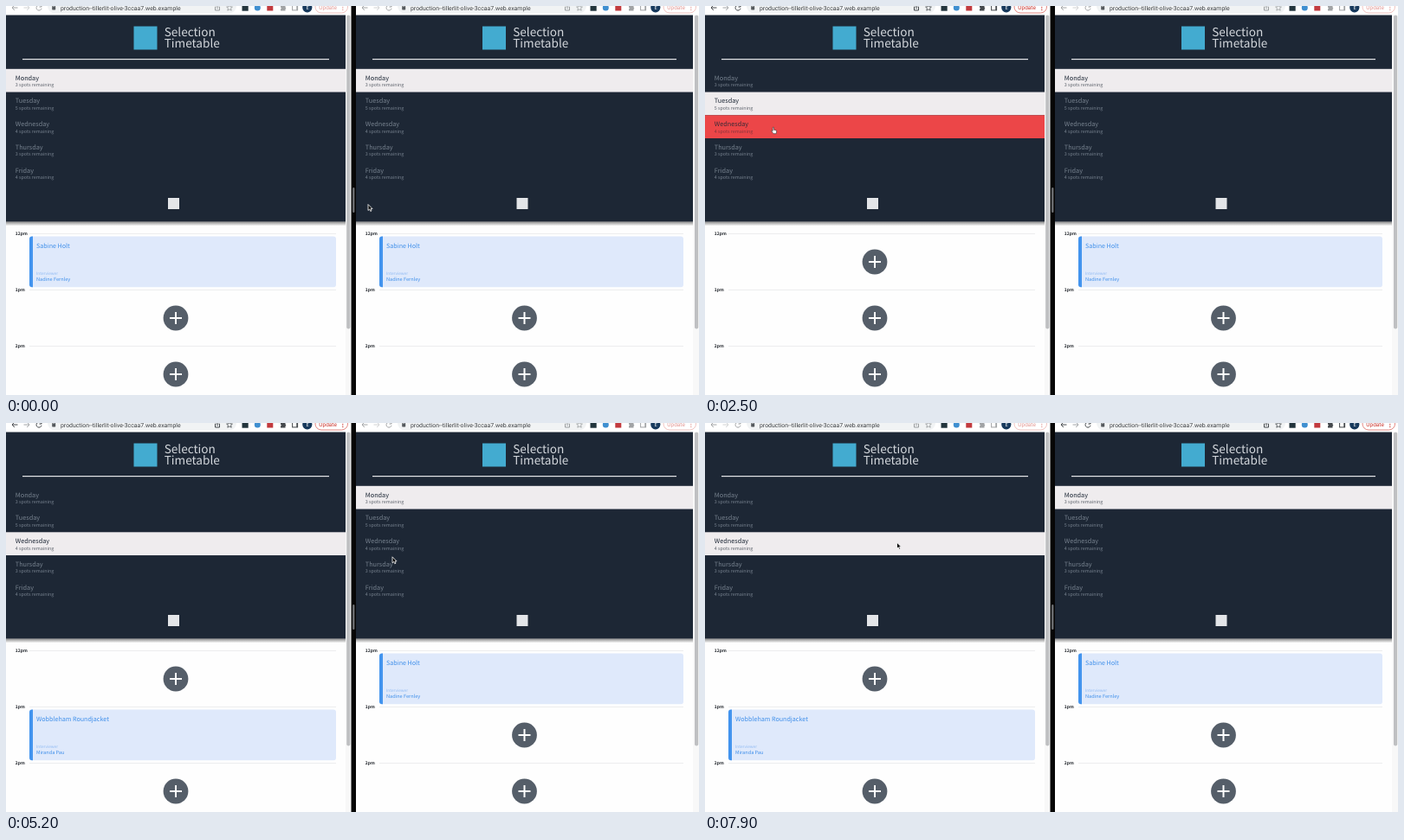
Animation, 800 px wide and 450 px high, one loop 8 s. Source, as an HTML page:

```html
<!DOCTYPE html>
<html lang="en">
<head>
<meta charset="utf-8">
<title>Selection Timetable</title>
<style>
html, body { margin: 0; width: 100%; height: 100%; overflow: hidden; background: #fefefe; }
svg { display: block; width: 800px; height: 450px; }
text {
  font-family: 'Noto Sans CJK JP', 'Noto Sans CJK SC', 'Noto Sans CJK', 'Noto Sans', sans-serif;
  text-rendering: geometricPrecision;
}
.bar text { font-family: Roboto, Inter, sans-serif; }
.brand { font-size: 13.6px; font-weight: 300; fill: #d3d7dc; }
.row rect { fill: none; }
.row .day { font-size: 7.3px; fill: #77828f; }
.row .spots { font-size: 5.4px; fill: #77828f; }
.row.sel rect { fill: #efecee; }
.row.sel .day { fill: #1d2735; }
.row.sel .spots { fill: #5d636c; }
.row.hov rect { fill: #ec4648; }
.row.hov .day { fill: #3b2b36; }
.row.hov .spots { fill: #85353d; }
.hour { font-size: 5px; font-weight: 700; fill: #22262c; }
.guest { font-size: 7.15px; fill: #3f8fea; }
.label { font-size: 4.7px; fill: #8fbaf3; }
.host { font-size: 5.6px; fill: #3f8fea; }
.icon { fill: none; stroke: #45494d; stroke-width: 1; }
.tools { opacity: .5; }
.focused .tools { opacity: 1; }
</style>
</head>
<body>
<svg id="stage" viewBox="0 0 800 450"></svg>
<script>
const DAYS = [['Monday', 3], ['Tuesday', 5], ['Wednesday', 4], ['Thursday', 3], ['Friday', 4]];
const HOURS = ['12pm', '1pm', '2pm'];
// day -> slot -> [guest, interviewer]
const BOOKINGS = [
  { 0: ['Sabine Holt', 'Nadine Fernley'] },
  {},
  { 1: ['Wobbleham Roundjacket', 'Miranda Pau'] }
];
const ROW_TOP = 72.8, ROW_H = 26.75, SLOT_H = 65;
const LOOP = 8000, STEP = 100;

const PANES = [
  { x: 0, w: 392, tools: 0, thumb: 393.2 },
  { x: 404, w: 389, tools: 402, thumb: 795 }
];

// time, x, y of the pointer tip
const PATH = [
  [0, 418, 229.5], [900, 330, 200], [1300, 150, 165], [1800, 52.5, 121.5],
  [2200, 52, 120], [2600, 84, 144], [2800, 84, 144], [3300, 89.5, 172.7],
  [3600, 240, 190], [4000, 447, 208.7], [4500, 449, 188], [5200, 446, 154.8],
  [5500, 442, 152], [6200, 339.5, 154.8], [6400, 350, 152], [6800, 450, 140],
  [7200, 432, 136], [7450, 300, 40], [7700, 164, 112], [7900, 221.5, 138.2], [8000, 221.5, 138.2]
];

const text = (cls, x, y, s) => `<text class="${cls}" x="${x}" y="${y}">${s}</text>`;
const rect = (x, y, w, h, fill, r = 0) =>
  `<rect x="${x}" y="${y}" width="${w}" height="${h}" rx="${r}" fill="${fill}"/>`;
const circle = (x, y, r, fill) => `<circle cx="${x}" cy="${y}" r="${r}" fill="${fill}"/>`;
const shift = (x, body, cls = '') => `<g class="${cls}" transform="translate(${x})">${body}</g>`;

function toolbar(p) {
  const nav = `<g class="icon">
    <path d="M13.5 2H7M9.8-1 7 2l2.8 3"/>
    <path d="M20.5 2H27M24.2-1 27 2l-2.8 3" stroke="#a2a5a8"/>
    <path d="M40.6.5A3 3 0 1 0 41 2.8M41-1.5V1h-2.6"/>
    <path d="M242.4 1H241.5V5h5V1H245.6M244 3.3V-2"/>
    <path d="M258-1.4l1 2.3 2.4.2-1.8 1.6.6 2.5-2.2-1.3-2.2 1.3.6-2.5-1.8-1.6 2.4-.2Z" stroke-width=".8"/>
  </g>`;
  const address = rect(48, -9, 218, 17.5, '#f1f3f4', 8.5) +
    rect(53.2, .8, 4, 3.6, '#55595d', .6) +
    `<path d="M54 1V-.6a1.2 1.2 0 0 1 2.4 0V1" class="icon" stroke-width=".7"/>` +
    `<text x="63" y="4.6" font-size="6.9" fill="#3a3d41">production--tillerlit-olive-3ccaa7.web.example</text>`;
  const marks = rect(272.5, -1.5, 7.2, 7.2, '#22343c') + circle(290.3, 2, 3.5, '#3f8fd0') +
    rect(301.3, -1.5, 7, 7, '#c23a3e') + circle(347.8, 1.8, 5.6, '#17395c') +
    '<text x="346.4" y="4" font-size="5.6" fill="#fff">E</text>';
  const pill = `<path d="M317-.2h1.6a1.2 1.2 0 0 1 2.4 0h1.5v1.6a1.2 1.2 0 0 1 0 2.2v2H317V3.5a1.1 1.1 0 0 0 0-2.1Z" fill="#45494d"/>
    <rect x="330.6" y="-1.5" width="6" height="6.4" class="icon"/><path d="M335.3-1.5h1.5v6.4h-1.5z" fill="#45494d"/>
    <rect x="357" y="-6" width="37.5" height="14" rx="7" fill="#fff" stroke="#dc6a62" stroke-width=".8"/>
    <text x="361.3" y="4.4" font-size="6.5" fill="#c9342c">Update</text>` +
    [-.4, 2, 4.4].map(y => circle(388.8, y, .7, '#c9342c')).join('');
  return rect(p.x, 0, p.w + 7, 10.3, '#fff') +
    shift(p.x, address + `<g class="tools">${nav}</g>`, 'bar') +
    shift(p.tools, marks + `<g class="tools">${pill}</g>`, 'bar');
}

function header(p) {
  const mid = p.w / 2;
  const rows = DAYS.map(([day, spots], i) => {
    const y = ROW_TOP + i * ROW_H;
    return `<g class="row"><rect x="0" y="${y}" width="${p.w}" height="${ROW_H}"/>` +
      text('day', 10.8, y + 12.8, day) +
      text('spots', 10.8, y + 20.3, `${spots} spots remaining`) + '</g>';
  }).join('');
  return rect(0, 10.3, p.w, 239.2, '#1d2735') +
    rect(0, 249.5, p.w, 5, 'url(#shade)') +
    rect(mid - 48.5, 23.5, 27, 27, '#43abd0') +
    text('brand', mid - 13.3, 35.4, 'Selection') +
    text('brand', mid - 13.3, 48.2, 'Timetable') +
    rect(19, 61, p.w - 38, 1.2, '#e6e7e9') + rows +
    rect(mid - 9, 222, 13, 13, '#e3e5e8');
}

function card(p, y, [guest, host]) {
  return rect(27, y + 3.2, p.w - 38, 58.6, '#dfe9fb', 3) +
    `<path d="M31 ${y + 3.2}v58.6h-1a3 3 0 0 1-3-3v-52.6a3 3 0 0 1 3-3z" fill="#4394ee"/>` +
    text('guest', 35, y + 16.8, guest) +
    text('label', 35, y + 47.2, 'Interviewer') +
    text('host', 35, y + 54.7, host);
}

function addButton(p, y) {
  const x = p.w / 2;
  return circle(x, y, 14.4, '#555e69') +
    `<path d="M${x - 7} ${y}h14M${x} ${y - 7}v14" stroke="#fff" stroke-width="2"/>`;
}

function agenda(p, bookings) {
  return '<g class="agenda">' + HOURS.map((hour, i) => {
    const y = 263.4 + i * SLOT_H;
    return text('hour', 10.8, y + 1.9, hour) + rect(27, y - .3, p.w - 38, .7, '#e6e7e9') +
      (bookings[i] ? card(p, y, bookings[i]) : addButton(p, y + 32.6));
  }).join('') + '</g>';
}

function pane(p) {
  return '<g class="pane">' + rect(p.x, 0, p.w + 7, 450, '#fefefe') +
    shift(p.x, BOOKINGS.map(b => agenda(p, b)).join('') + header(p)) +
    rect(p.x + p.w, 10.3, 7, 440, '#f8f8f8') +
    rect(p.thumb, 10.5, 4.2, 363, '#bfc0c2', 2.1) + toolbar(p) + '</g>';
}

const stage = document.getElementById('stage');
stage.innerHTML = `<defs><linearGradient id="shade" x2="0" y2="1">
    <stop stop-color="#000" stop-opacity=".45"/><stop offset="1" stop-color="#000" stop-opacity="0"/>
  </linearGradient></defs>` +
  PANES.map(pane).join('') +
  rect(398.5, 0, 5.5, 450, '#060606') + rect(400.2, 210, 2.2, 29, '#727477', 1.1) +
  `<g id="pointer" stroke-linejoin="round">
    <path id="arrow" d="M0 0V7L1.7 5.6 2.8 8 4 7.4 3 5.1H5.1Z" fill="#0b0b0b" stroke="#fff" stroke-width=".8"/>
    <path id="hand" d="M-.8.6a.7.7 0 0 1 1.4 0V3l2.3.5q.9.2.8 1.2L3.2 7.4H0L-2.2 4.6q-.2-1 .6-.8l.8.7Z"
      fill="#fff" stroke="#222" stroke-width=".55"/>
  </g>`;

const [pointer, arrow, hand] = ['pointer', 'arrow', 'hand'].map(id => document.getElementById(id));
const views = [...stage.querySelectorAll('.pane')].map(el => ({
  el,
  rows: [...el.querySelectorAll('.row')],
  agendas: [...el.querySelectorAll('.agenda')]
}));
const show = (el, on) => el.setAttribute('display', on ? 'inline' : 'none');

function pointerAt(t) {
  const i = PATH.findIndex(k => k[0] > t);
  const [t0, x0, y0] = PATH[i - 1], [t1, x1, y1] = PATH[i];
  const u = (t - t0) / (t1 - t0), e = u * u * (3 - 2 * u);
  return [x0 + (x1 - x0) * e, y0 + (y1 - y0) * e];
}

function draw(t) {
  const [x, y] = pointerAt(t);
  const focus = t < 1200 ? -1 : t < 6800 ? 0 : 1;
  const chosen = [t < 2100 ? 0 : t < 2800 ? 1 : 2, 0];
  const rowUnder = Math.floor((y - ROW_TOP) / ROW_H);
  let overRow = false;

  views.forEach((v, n) => {
    const p = PANES[n];
    const active = n === focus;
    const inside = active && x >= p.x && x < p.x + p.w;
    v.el.setAttribute('class', active ? 'pane focused' : 'pane');
    v.rows.forEach((row, i) => {
      const hot = inside && i === rowUnder;
      overRow = overRow || hot;
      row.setAttribute('class', i === chosen[n] ? 'row sel' : hot ? 'row hov' : 'row');
    });
    v.agendas.forEach((a, i) => show(a, i === chosen[n]));
  });

  show(hand, overRow);
  show(arrow, !overRow);
  pointer.setAttribute('transform', `translate(${x.toFixed(2)} ${y.toFixed(2)})`);
}

const start = performance.now();
function tick() {
  const t = (performance.now() - start) % LOOP;
  draw(Math.floor(t / STEP) * STEP);
  requestAnimationFrame(tick);
}
tick();
</script>
</body>
</html>
```
